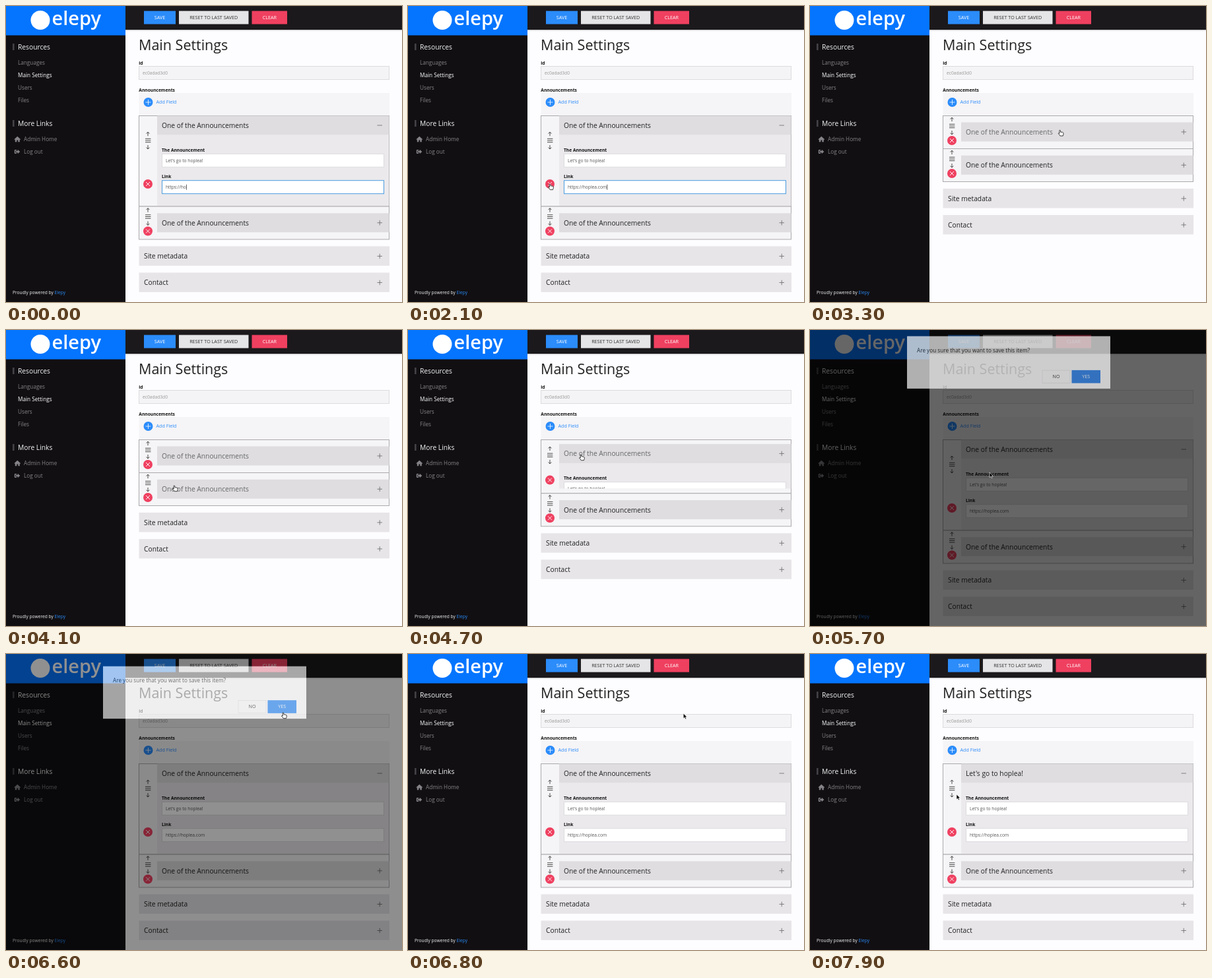
An HTML page that plays this animation: 600 by 449 pixels, repeating every 8000 ms.

```html
<!DOCTYPE html>
<html lang="en">
<head>
<meta charset="utf-8">
<title>Main Settings</title>
<style>
html, body { margin: 0; width: 100%; height: 100%; overflow: hidden; background: #fdfcfe; }
svg { display: block; }
text { font-family: "Open Sans", sans-serif; white-space: pre; }
</style>
</head>
<body>
<script>
const LOOP = 8000, BLUE = '#2b8cfa', RED = '#ef4060', INK = '#222';
const ADDRESS = 'https://hoplea.com', NOTE = "Let's go to hoplea!";
const TYPED = [100, 300, 500, 700, 900, 1300, 1600, 1900];
const MOUSE = [
  [2100, 215, 270], [2300, 222, 264], [2900, 390, 184], [3150, 390, 184],
  [4000, 255, 236], [4250, 255, 236], [4500, 262, 189], [4700, 262, 189],
  [5200, 272, 216], [5850, 272, 216], [6350, 420, 89], [6700, 420, 89],
  [7200, 394, 100], [7700, 222, 213]
];

// Markup helpers
const rect = (x, y, w, h, fill, more = '') =>
  `<rect x="${x}" y="${y}" width="${w}" height="${h}" fill="${fill}" ${more}/>`;
const text = (x, y, size, fill, str, more = '') =>
  `<text x="${x}" y="${y}" font-size="${size}" fill="${fill}" ${more}>${str}</text>`;
const line = (d, color = INK, width = .8, more = '') =>
  `<path d="${d}" fill="none" stroke="${color}" stroke-width="${width}" ${more}/>`;
const group = (id, body) => `<g id="${id}">${body}</g>`;
const label = (x, y, str) => text(x, y, 6.67, '#111', str, 'font-weight="700"');
const button = (x, y, w, h, fill, color, str, more = '') =>
  rect(x, y, w, h, fill, more) +
  text(x + w / 2, y + h / 2 + 2.5, 7.18, color, str, 'text-anchor="middle"');
const plus = y => line(`M562.5 ${y}h7.5M566.25 ${y - 3.75}v7.5`, '#666', .8);
const bar = (y, str) => rect(201.5, y, 379.5, 29.5, '#e7e5e8') + text(209, y + 18.5, 10.26, INK, str) + plus(y + 15);

const handle = id => group(id,
  line('M215 9.2V3.2M212.6 5.6L215 3.2L217.4 5.6') +
  line('M211 13.3h8.4M211 16h8.4M211 18.7h8.4') +
  line('M215 23v6M212.6 26.6L215 29L217.4 26.6'));
const remove = id => group(id,
  `<circle cx="215" cy="0" r="7" fill="${RED}"/>` + line('M212 -3l6 6m0 -6l-6 6', '#fff', .9));
const field = (y, id, str) =>
  rect(236.5, y, 336, 20, '#fff', `id="${id}Box" stroke="#dddbde"`) +
  text(242, y + 12.4, 6.67, '#555', str, `id="${id}"`);

const sidebar = rect(0, 0, 181, 449, '#110f12') + rect(0, 0, 181, 44.5, '#0575ff') +
  '<circle cx="52" cy="21.5" r="14.5" fill="#fff"/>' +
  text(69.5, 29, 29, '#fff', 'elepy', 'font-weight="600"') +
  [['Resources', 62], ['More Links', 178]].map(([s, y]) =>
    rect(10, y - 5, 2.6, 10, '#444246') + text(18, y + 3.7, 10.26, '#f4f4f4', s)).join('') +
  [['Languages', 86], ['Main Settings', 105], ['Users', 124], ['Files', 143]].map(([s, y]) =>
    text(18, y + 2.8, 8.21, y === 105 ? '#fff' : '#858387', s)).join('') +
  text(27, 204.8, 8.21, '#858387', 'Admin Home') + text(27, 223.8, 8.21, '#858387', 'Log out') +
  '<path d="M17.3 197.8l4.9 4.4l-.7 .7l-.7 -.6v3.9h-2.5v-2.7h-2v2.7h-2.5v-3.9l-.7 .6l-.7 -.7z" fill="#858387"/>' +
  '<path d="M16 218v1.3h-1.7v3.4H16v1.3h-2.2q-1 0 -1 -1v-4q0 -1 1 -1zM17.7 217.7l3.6 3.3l-3.6 3.3v-2.1h-2.6v-2.4h2.6z" fill="#858387"/>' +
  text(10, 437.3, 6.67, '#f4f4f4', `Proudly powered by <tspan fill="${BLUE}">Elepy</tspan>`);

const page = rect(181, 0, 419, 36, '#1b191c') + rect(181, 36, 419, 1.5, '#000', 'opacity=".15"') +
  button(209, 7.5, 48, 20, BLUE, '#fff', 'SAVE') +
  button(262, 7.5, 105.5, 20, '#e5e4e6', '#333', 'RESET TO LAST SAVED') +
  button(372.5, 7.5, 53.5, 20, RED, '#fff', 'CLEAR') +
  text(201, 66.7, 21.5, INK, 'Main Settings') +
  label(201.3, 88.7, 'id') + rect(201.5, 91.5, 379, 20, '#f4f3f5', 'stroke="#dddbde"') +
  text(207, 104, 6.67, '#999', 'ec0adad3d0') +
  label(201.3, 129.6, 'Announcements') + rect(201.5, 132, 379.5, 34, '#f5f4f6') +
  `<circle cx="215.5" cy="146" r="7" fill="${BLUE}"/>` +
  line('M211.5 146h8M215.5 142v8', '#fff') + text(227.5, 148.2, 7.18, BLUE, 'Add Field');

const item = (n, icon, body = '') => group('item' + n,
  rect(201.5, .5, 379, 50, '#f5f4f6', `id="frame${n}" stroke="#aba9ac"`) + body +
  handle('handle' + n) + remove('remove' + n) +
  group('head' + n, rect(229, .5, 351.5, 29, '#dfdde0') +
    text(236, 19, 10.26, INK, 'One of the Announcements', `id="title${n}"`) + icon));

const details = '<svg id="details" x="229" width="351.5" height="108" viewBox="229 0 351.5 108" preserveAspectRatio="xMinYMin slice">' +
  rect(229, 0, 351.5, 108, '#ebe9ec') +
  label(236, 25.3, 'The Announcement') + field(28.8, 'note', NOTE) +
  label(236, 65.8, 'Link') + field(69.2, 'link', '') +
  rect(0, 75.3, .7, 8, '#222', 'id="caret"') + '</svg>';

const dialog = group('modal', rect(0, 0, 600, 449, '#000', 'opacity=".6"') +
  group('dialog', rect(147, 0, 308, 79.5, '#fff') +
    text(162, 24.6, 8.21, '#333', 'Are you sure that you want to save this item?') +
    button(352, 51.7, 42, 19.3, '#fff', INK, 'NO', 'stroke="#ddd" stroke-width=".6"') +
    button(396.5, 51.5, 43.5, 19.7, BLUE, '#fff', 'YES', 'id="yes"')));

const pointer = group('pointer',
  '<path id="arrow" d="M0 0v7.6l1.8 -1.6l1.2 2.7l1.4 -.6l-1.2 -2.6h2.4z" fill="#000" stroke="#fff" stroke-width=".6"/>' +
  '<path id="hand" d="M-.9 .4q.8 -.9 1.5 0l.5 2.5q3.4 -.2 4.1 1.2q.4 2.2 -.7 4.6h-4.2q-1.1 -2 -2.9 -3.7q.4 -1.2 2 -.1z" fill="#fff" stroke="#111" stroke-width=".8"/>');

document.body.innerHTML = '<svg width="600" height="449" viewBox="0 0 600 449">' +
  rect(0, 0, 600, 449, '#fdfcfe') + sidebar + page +
  item(1, plus(15), details) + item(2, plus(15)) +
  group('bars', bar(11, 'Site metadata') + bar(51, 'Contact')) + dialog + pointer + '</svg>';

// Animation helpers
const $ = id => document.getElementById(id);
const set = (id, name, value) => $(id).setAttribute(name, value);
const move = (id, x, y) => set(id, 'transform', `translate(${x} ${y})`);
const show = (id, on) => set(id, 'visibility', on ? 'visible' : 'hidden');
const within = (t, a, b) => t >= a && t < b;
const ramp = (t, start, length) => Math.min(1, Math.max(0, (t - start) / length));
const smooth = u => u * u * (3 - 2 * u);

// The first item's plus turns into a minus when open
const toggle = $('head1').querySelector('path');

function mouseAt(t) {
  let i = MOUSE.findIndex(p => p[0] > t);
  if (i < 0) return MOUSE[MOUSE.length - 1].slice(1);
  if (i === 0) return MOUSE[0].slice(1);
  const [t0, x0, y0] = MOUSE[i - 1], [t1, x1, y1] = MOUSE[i];
  const u = smooth((t - t0) / (t1 - t0));
  return [x0 + (x1 - x0) * u, y0 + (y1 - y0) * u];
}

function draw(t) {
  // Accordion
  const open = 1 - smooth(ramp(t, 3050, 250)) + smooth(ramp(t, 4600, 250));
  const height = 50 + 87.5 * open, head = 10 * (1 - open);
  move('item1', 0, 166);
  set('frame1', 'height', height);
  move('handle1', 0, 22 * open + 0);
  move('remove1', 0, 38 + 66 * open);
  move('head1', 0, head);
  set('details', 'y', head + 29.5);
  set('details', 'height', 108 * open);
  toggle.setAttribute('d', 'M562.5 15h7.5' + (open < .5 ? 'M566.25 11.25v7.5' : ''));
  move('item2', 0, 166 + height);
  move('handle2', 0, 0);
  move('remove2', 0, 38);
  move('head2', 0, 10.3);
  move('bars', 0, 166 + height + 50);
  $('title1').textContent = t < 6900 ? 'One of the Announcements' : NOTE;
  set('title1', 'fill', within(t, 2750, 4750) ? '#666' : INK);
  set('title2', 'fill', within(t, 3800, 4350) ? '#666' : INK);

  // Typing
  const focus = t < 3050;
  const value = ADDRESS.slice(0, 10 + TYPED.filter(s => s <= t).length);
  if ($('link').textContent !== value) $('link').textContent = value;
  set('linkBox', 'stroke', focus ? '#4a9be0' : '#dddbde');
  set('caret', 'x', 242.3 + $('link').getComputedTextLength());
  show('caret', focus && (t < 1900 || (t - 1900) % 1000 < 500));

  // Confirmation
  const closing = t >= 6560;
  const fade = closing ? 1 - ramp(t, 6560, 150) : ramp(t, 5496, 150);
  const slide = closing ? 1 - ramp(t, 6560, 300) : ramp(t, 5496, 300);
  show('modal', fade > 0);
  set('modal', 'opacity', fade);
  set('dialog', 'opacity', slide);
  move('dialog', 0, -25.65 + 51.3 * slide);
  set('yes', 'fill', within(t, 6250, 6800) ? '#2b8cfa' : '#1c78ea');

  // Mouse
  const hand = t < 2250 || within(t, 2700, 4850) || within(t, 6250, 6750);
  move('pointer', ...mouseAt(t));
  set('pointer', 'opacity', t < 2100 ? 0 : 1);
  show('hand', hand);
  show('arrow', !hand);
}

function tick(now) {
  draw(now % LOOP);
  requestAnimationFrame(tick);
}
draw(0);
requestAnimationFrame(tick);
</script>
</body>
</html>
```
